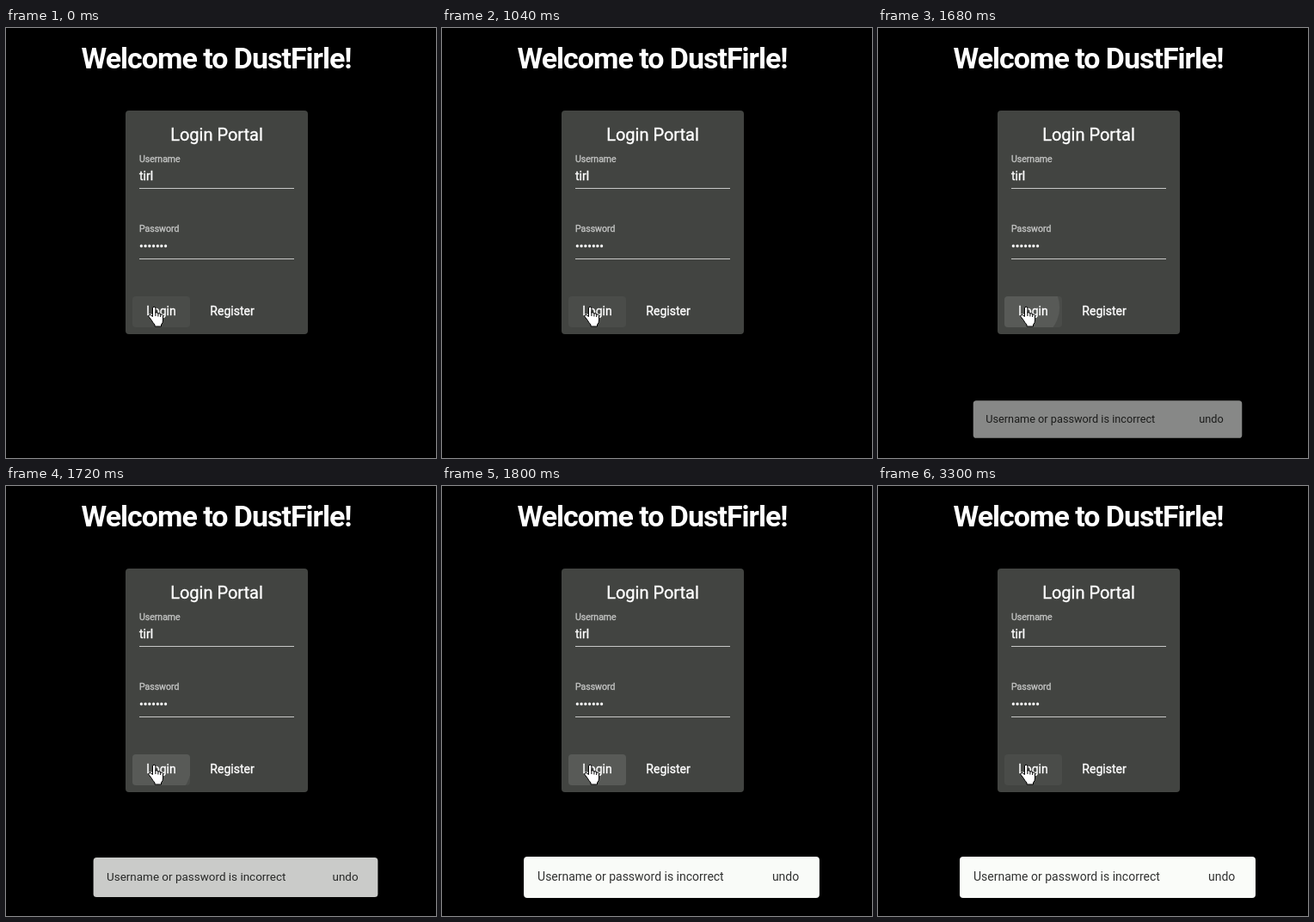
Recreate the animation shown at these times as an HTML page. Size 500x500 px, loop 3600 ms.

```html
<!DOCTYPE html>
<html lang="en">
<head>
<meta charset="utf-8">
<title>Login</title>
<style>
  html, body { margin: 0; width: 100%; height: 100%; overflow: hidden; background: #000; }
  svg { display: block; width: 500px; height: 500px; font: 14px Roboto, sans-serif; fill: #fff; }
  .title { font-size: 34px; font-weight: 700; letter-spacing: -.03em; }
  .heading { font-size: 20px; }
  .mid { text-anchor: middle; }
  .label { font-size: 10.5px; fill: #c3c4c3; stroke: #c3c4c3; }
  .line { fill: #c7c8c7; }
  .form { stroke-width: .35px; }
  .form text:not(.label) { stroke: #fff; }
  #snack text { fill: #323332; }
</style>
</head>
<body>
<svg viewBox="0 0 500 500">
  <clipPath id="edge"><rect x="147" y="312" width="67" height="36" rx="4"/></clipPath>
  <text class="title" x="87.500" y="47">Welcome to DustFirle!</text>

  <rect x="139" y="96" width="212" height="260" rx="4" fill="#424441"/>
  <g clip-path="url(#edge)">
    <rect x="147" y="312" width="67" height="36" fill="#4a4c49"/>
    <circle id="ripple" cx="173" cy="325"/>
  </g>
  <g class="form">
    <text class="heading mid" x="245" y="131">Login Portal</text>
    <text class="label" x="155" y="156">Username</text>
    <text x="155" y="177">tirl</text>
    <rect class="line" x="155" y="186" width="180" height="1"/>
    <text class="label" x="155" y="237">Password</text>
    <text x="155" y="259">•••••••</text>
    <rect class="line" x="155" y="268" width="180" height="1"/>
    <text class="mid" x="180.5" y="334">Login</text>
    <text class="mid" x="263" y="334">Register</text>
  </g>

  <g id="snack">
    <rect x="95" y="431" width="344" height="48" rx="4" fill="#fafcf9"/>
    <text x="111" y="459">Username or password is incorrect</text>
    <text x="384" y="459">undo</text>
  </g>

  <!-- hand pointer -->
  <g stroke="#000" stroke-linejoin="round">
    <path d="M170.5 326q0-1.8 1.7-1.8t1.7 1.8v5q2.6-1 3 1 2.4-.8 2.8 1 2.4-.4 2.8 1.6v5.4q0 3-2 5v2h-7.5v-2q-2-2-4-5.5l-3-4q-.6-2.4 1.8-2l2.7 2z"/>
    <path d="M173.9 330.5v4.5M176.9 332v3.5M179.7 333v3" fill="none"/>
  </g>
</svg>
<script>
const LOOP = 3600;
const ripple = document.getElementById('ripple');
const snack = document.getElementById('snack');
const origin = performance.now();

// cubic-bezier(0, 0, .2, 1) over the span from start, solved by bisection
function ease(time, start, span) {
  const x = Math.min(1, Math.max(0, (time - start) / span));
  let lo = 0, hi = 1;
  for (let i = 0; i < 20; i++) {
    const u = (lo + hi) / 2;
    if (.6 * (1 - u) * u * u + u ** 3 < x) lo = u; else hi = u;
  }
  return lo * lo * (3 - 2 * lo);
}

function draw(t) {
  const grow = ease(t, 1541, 315);
  const fade = 1 - ease(t, 1980, 450);
  ripple.setAttribute('r', 48 * grow);
  ripple.setAttribute('fill-opacity', .08 * Math.min(1, grow * 1.4) * fade);

  const show = ease(t, 1642, 172);
  const scale = .8 + .2 * show;
  snack.setAttribute('opacity', show);
  snack.setAttribute('transform', `translate(267 455) scale(${scale}) translate(-267 -455)`);
}

function tick() {
  draw((performance.now() - origin) % LOOP);
  requestAnimationFrame(tick);
}
tick();
</script>
</body>
</html>
```
